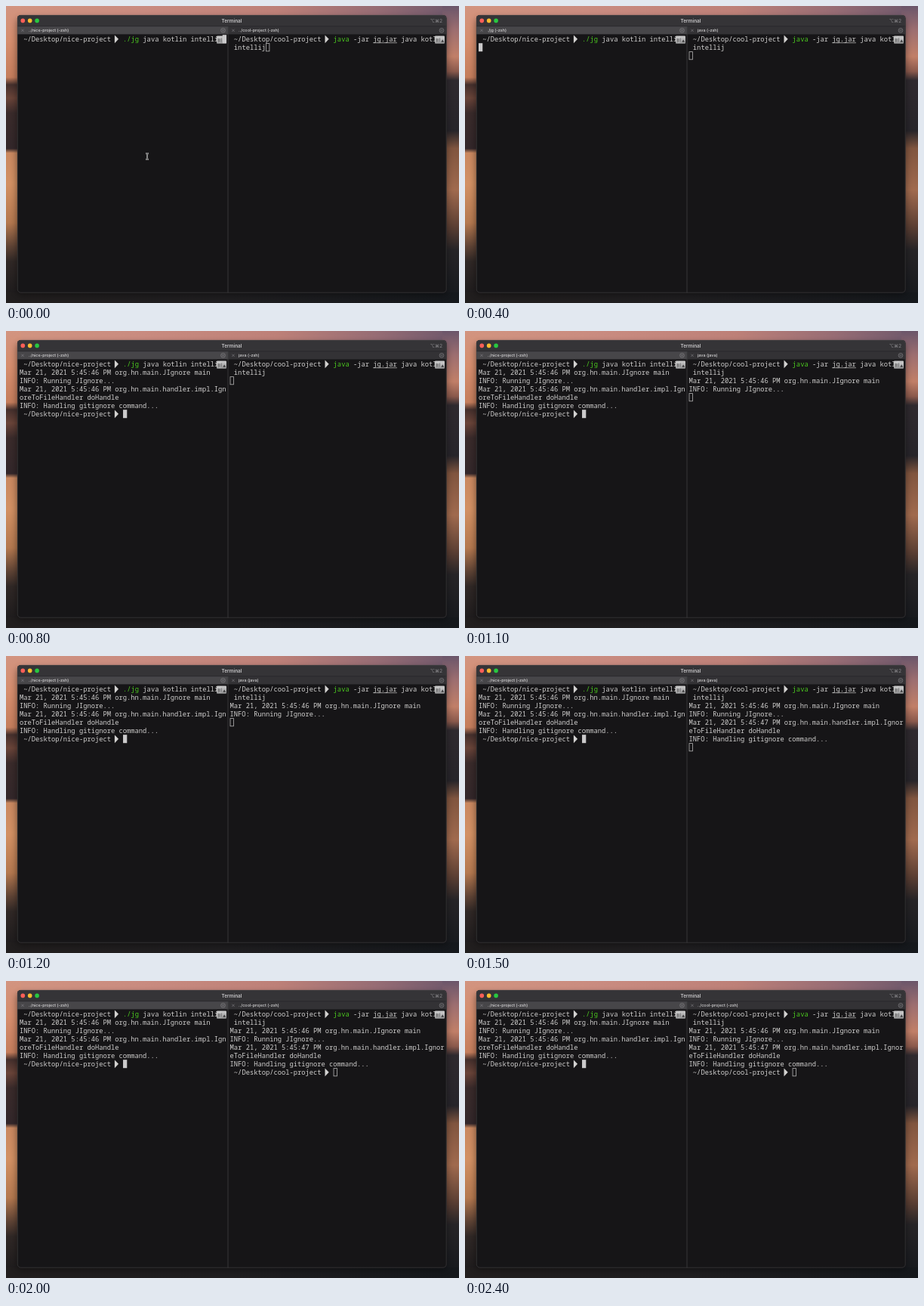
An HTML page for the animation above (2500 ms loop, 600 by 393 pixels).

```html
<!DOCTYPE html>
<html lang="en">
<head>
<meta charset="utf-8">
<title>Terminal</title>
<style>
  html, body { margin: 0; width: 100%; height: 100%; overflow: hidden; background: #0d0b0c; }
  svg { display: block; width: 600px; height: 393px; }
  text { white-space: pre; }
  .mono { font: 8.78px "Noto Sans Mono", "DejaVu Sans Mono", monospace; fill: #cfcecd; }
  .ui { font-family: Inter, "DejaVu Sans", sans-serif; }
  .tab { font-size: 5.4px; font-weight: 500; fill: #d6d5d6; }
</style>
</head>
<body>
<svg id="stage" viewBox="0 0 600 393" xmlns="http://www.w3.org/2000/svg">
  <defs>
    <linearGradient id="sky">
      <stop offset="0" stop-color="#d29480"/><stop offset=".3" stop-color="#c98b80"/>
      <stop offset=".6" stop-color="#bd8078"/><stop offset=".82" stop-color="#966c74"/>
      <stop offset="1" stop-color="#6b566a"/>
    </linearGradient>
    <linearGradient id="west" x2="0" y2="1">
      <stop offset="0" stop-color="#d29480"/><stop offset=".12" stop-color="#d58d6d"/>
      <stop offset=".24" stop-color="#c47d5c"/><stop offset=".265" stop-color="#45302d"/>
      <stop offset=".31" stop-color="#6a4439"/><stop offset=".36" stop-color="#3a2b2b"/>
      <stop offset=".48" stop-color="#33272a"/><stop offset=".495" stop-color="#c98860"/>
      <stop offset=".6" stop-color="#d29063"/><stop offset=".73" stop-color="#b4784f"/>
      <stop offset=".81" stop-color="#5e4335"/><stop offset=".86" stop-color="#302826"/>
      <stop offset="1" stop-color="#1a191b"/>
    </linearGradient>
    <linearGradient id="east" x2="0" y2="1">
      <stop offset="0" stop-color="#6b566a"/><stop offset=".08" stop-color="#9c6e70"/>
      <stop offset=".17" stop-color="#c17f68"/><stop offset=".22" stop-color="#8a594c"/>
      <stop offset=".25" stop-color="#2f2a2f"/><stop offset=".42" stop-color="#27252a"/>
      <stop offset=".48" stop-color="#80553f"/><stop offset=".62" stop-color="#a06a4e"/>
      <stop offset=".74" stop-color="#5d4034"/><stop offset=".82" stop-color="#262427"/>
      <stop offset="1" stop-color="#15181c"/>
    </linearGradient>
    <linearGradient id="ground">
      <stop offset="0" stop-color="#211e1e"/><stop offset=".5" stop-color="#1f1e20"/>
      <stop offset="1" stop-color="#15181c"/>
    </linearGradient>
    <linearGradient id="metal" x2="0" y2="1">
      <stop offset="0" stop-color="#e4e4e4"/><stop offset="1" stop-color="#a9a9aa"/>
    </linearGradient>
    <filter id="blur" x="-10%" y="-10%" width="120%" height="120%">
      <feGaussianBlur stdDeviation="4"/>
    </filter>
  </defs>

  <rect width="600" height="14" fill="url(#sky)"/>
  <rect width="20" height="393" fill="url(#west)"/>
  <rect x="578" width="22" height="393" fill="url(#east)"/>
  <rect y="379" width="600" height="14" fill="url(#ground)"/>
  <rect x="14" y="16" width="570" height="366" rx="6" fill="#000" opacity=".4" filter="url(#blur)"/>

  <rect x="15" y="12" width="568.5" height="367.5" rx="4.5" fill="#161517"/>
  <path d="M15 27V16.5a4.5 4.5 0 0 1 4.5-4.5H579a4.5 4.5 0 0 1 4.5 4.5V27z" fill="#353437"/>
  <rect x="15" y="27" width="279" height="10.5" fill="#474649"/>
  <rect x="294" y="27" width="289.5" height="10.5" fill="#333235"/>
  <path d="M15 26.7H583.5M15 37.5H583.5" stroke="#232225" stroke-width=".6"/>
  <path d="M294 27V379.5" stroke="#414043" stroke-width=".8"/>
  <rect x="15.3" y="12.3" width="567.9" height="366.9" rx="4.3" fill="none" stroke="#454345" stroke-width=".6"/>

  <circle cx="22.3" cy="19.4" r="2.8" fill="#fe5f57"/>
  <circle cx="31.7" cy="19.4" r="2.8" fill="#febc2e"/>
  <circle cx="41.1" cy="19.4" r="2.8" fill="#28c840"/>
  <text class="ui" x="299" y="22" text-anchor="middle" font-size="6.4" font-weight="600" fill="#c6c5c7">Terminal</text>
  <text class="ui" x="578" y="21.6" text-anchor="end" font-size="6.2" fill="#8d8c8f">⌥⌘2</text>
</svg>
<script>
const svg = document.getElementById('stage');
const LOOP = 2500, CW = 5.27, LH = 11, TOP = 38.2;
const LEFT = 18, RIGHT = 296.6;
const GREEN = '#4bc81f';

// Moments (ms) at which the panes change
const ENTER = 100, TITLE = 300, DONE = 500, BOOT = 900, LOG1 = 1000, LOG2 = 1300, END = 1700;
const timed = [];

function add(tag, attrs, from = 0, to = LOOP, content = '') {
  const el = document.createElementNS(svg.namespaceURI, tag);
  for (const k in attrs) el.setAttribute(k, attrs[k]);
  el.textContent = content;
  svg.appendChild(el);
  if (from > 0 || to < LOOP) timed.push({ el, from, to });
  return el;
}

function type(pane, row, col, str, from, to, extra = {}) {
  add('text', { class: 'mono', x: pane + col * CW, y: TOP + row * LH + 8.5, ...extra }, from, to, str);
}

function prompt(pane, row, dir, from) {
  type(pane, row, 1, '~/Desktop/' + dir, from);
  const x = pane + 24 * CW - .6, y = TOP + row * LH;
  add('path', { d: `M${x} ${y + .2}l5.2 5.4l-5.2 5.4z`, fill: '#d3d2d1' }, from);
}

function cursor(pane, row, col, from, to) {
  const solid = pane === LEFT, inset = solid ? 0 : .4;
  add('rect', {
    x: pane + col * CW + inset, y: TOP + row * LH + inset,
    width: CW - 2 * inset, height: LH - 2 * inset,
    fill: solid ? '#cbcacb' : 'none', stroke: solid ? 'none' : '#b5b4b5', 'stroke-width': .8
  }, from, to);
}

function tab(x, str, from, to) {
  add('text', { class: 'ui tab', x, y: 34 }, from, to, str);
}

function tabIcons(x, end) {
  add('path', { d: `M${x - 1.7} 30.6l3.4 3.4m0-3.4l-3.4 3.4`, stroke: '#858488', 'stroke-width': .6 });
  add('circle', { cx: end, cy: 32.3, r: 2.9, fill: 'none', stroke: '#8f8e91', 'stroke-width': .6 });
  add('path', { d: `M${end - 1.7} 31.7h3.4m-3.4 1.3h3.4`, stroke: '#8f8e91', 'stroke-width': .5 });
}

function badge(x) {
  add('rect', { x, y: 39.5, width: 13, height: 10.2, rx: 1, fill: 'url(#metal)', opacity: .88 });
  add('path', { d: `M${x + 2.4} 43v4.5m1.6-4.5v4.5M${x + 6.2} 42.5v5`, stroke: '#59585a', 'stroke-width': .8 });
  add('path', { d: `M${x + 8.2} 47.8l2-3.4l2 3.4z`, fill: '#3d3c3e' });
}

function log(pane, row, sec, cls, from) {
  type(pane, row, 0, `Mar 21, 2021 5:45:${sec} PM org.hn.main.${cls}`, from);
}

// Tab bar
tabIcons(22, 287.5);
tabIcons(301, 577);
tab(29.5, '../nice-project (-zsh)', 0, TITLE);
tab(29.5, './jg (-zsh)', TITLE, DONE);
tab(29.5, '../nice-project (-zsh)', DONE);
tab(308, '../cool-project (-zsh)', 0, TITLE);
tab(308, 'java (-zsh)', TITLE, BOOT);
tab(308, 'java (java)', BOOT, END);
tab(308, '../cool-project (-zsh)', END);

// Left pane
prompt(LEFT, 0, 'nice-project');
type(LEFT, 0, 26, './jg', 0, LOOP, { style: 'fill:' + GREEN });
type(LEFT, 0, 31, 'java kotlin intellij');
badge(279);
cursor(LEFT, 0, 51, 0, ENTER);
cursor(LEFT, 1, 0, ENTER, DONE);
log(LEFT, 1, 46, 'JIgnore main', DONE);
type(LEFT, 2, 0, 'INFO: Running JIgnore...', DONE);
log(LEFT, 3, 46, 'handler.impl.Ign', DONE);
type(LEFT, 4, 0, 'oreToFileHandler doHandle', DONE);
type(LEFT, 5, 0, 'INFO: Handling gitignore command...', DONE);
prompt(LEFT, 6, 'nice-project', DONE);
cursor(LEFT, 6, 26, DONE);

// Right pane
prompt(RIGHT, 0, 'cool-project');
type(RIGHT, 0, 26, 'java', 0, LOOP, { style: 'fill:' + GREEN });
type(RIGHT, 0, 31, '-jar');
type(RIGHT, 0, 36, 'jg.jar');
add('path', { d: `M${RIGHT + 36 * CW} 48.7h${6 * CW}`, stroke: '#cfcecd', 'stroke-width': .7 });
type(RIGHT, 0, 43, 'java kotlin');
badge(568);
type(RIGHT, 1, 1, 'intellij');
cursor(RIGHT, 1, 9, 0, ENTER);
cursor(RIGHT, 2, 0, ENTER, LOG1);
log(RIGHT, 2, 46, 'JIgnore main', LOG1);
type(RIGHT, 3, 0, 'INFO: Running JIgnore...', LOG1);
cursor(RIGHT, 4, 0, LOG1, LOG2);
log(RIGHT, 4, 47, 'handler.impl.Ignor', LOG2);
type(RIGHT, 5, 0, 'eToFileHandler doHandle', LOG2);
type(RIGHT, 6, 0, 'INFO: Handling gitignore command...', LOG2);
cursor(RIGHT, 7, 0, LOG2, END);
prompt(RIGHT, 7, 'cool-project', END);
cursor(RIGHT, 7, 26, END);

// Mouse pointer
const beam = 'M185 195.2q2 0 2 1.2q0-1.2 2-1.2M187 196.2v5.6M185 202.8q2 0 2-1.2q0 1.2 2 1.2';
add('path', { d: beam, fill: 'none', stroke: '#d0d0d0', 'stroke-width': 1.7 }, 0, ENTER);
add('path', { d: beam, fill: 'none', stroke: '#222', 'stroke-width': .6 }, 0, ENTER);

function draw(t) {
  for (const { el, from, to } of timed) el.style.display = t >= from && t < to ? '' : 'none';
}

const start = performance.now();
function tick() {
  draw((performance.now() - start) % LOOP);
  requestAnimationFrame(tick);
}
tick();
</script>
</body>
</html>
```
